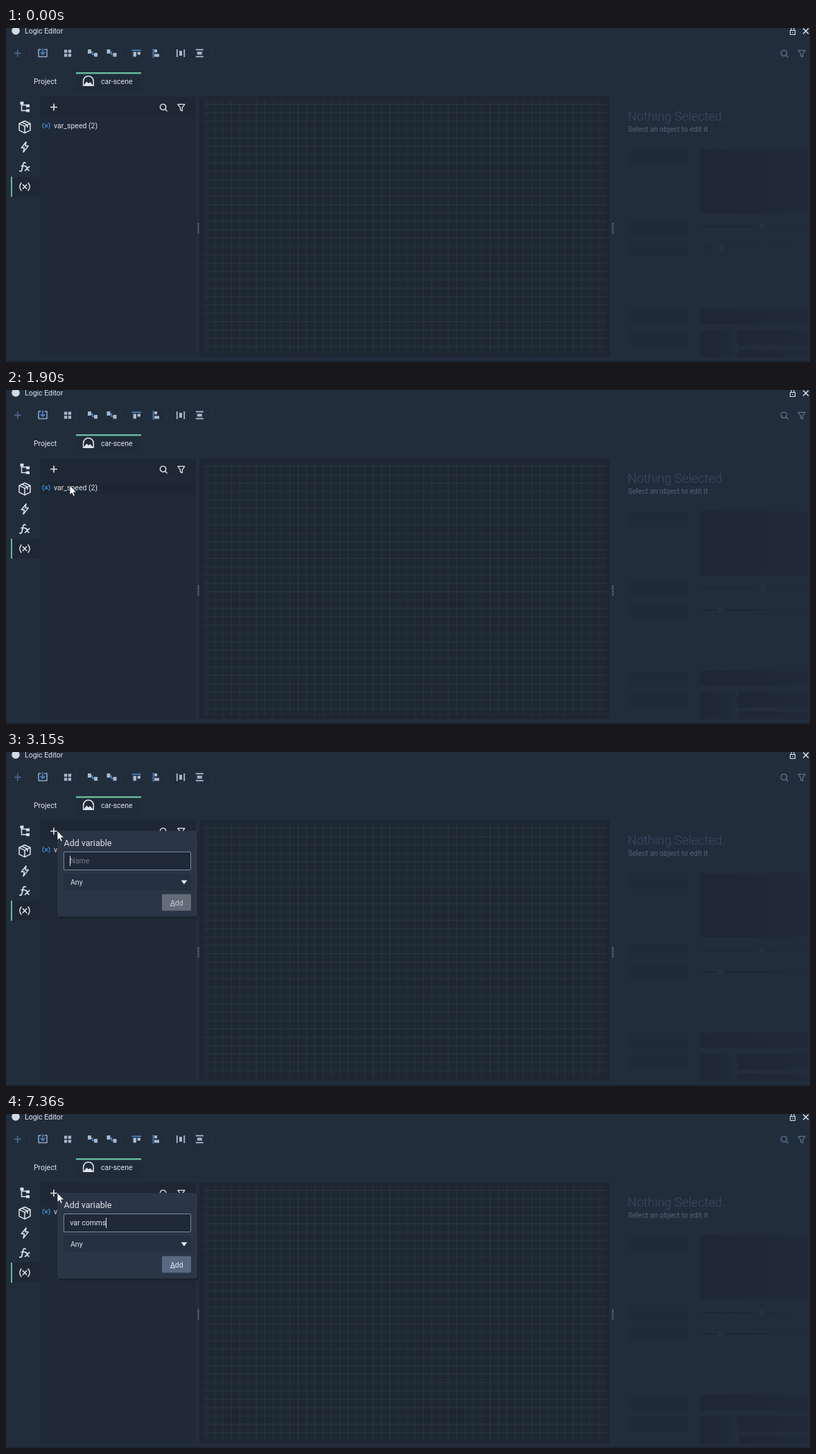
Recreate the animation shown at these times as an HTML page. Size 1160 by 483 pixels, loop 7.99 s.

```html
<!DOCTYPE html>
<html lang="en">
<head>
<meta charset="utf-8">
<title>Logic Editor</title>
<style>
html, body { margin: 0; width: 100%; height: 100%; overflow: hidden; background: #222d3c; }
svg { display: block; width: 100vw; height: 100vh; }
text { font-family: Roboto, "Noto Sans", sans-serif; font-size: 10.5px; fill: #dfe3e8; white-space: pre; }
.line { fill: none; stroke: #dfe5ec; stroke-width: 1.5; stroke-linecap: round; stroke-linejoin: round; }
.blue { stroke: #4b8cd0; }
</style>
</head>
<body>
<svg viewBox="0 0 1160 483">
<defs>
  <linearGradient id="fade">
    <stop offset="0" stop-color="#1e2733"/>
    <stop offset=".5" stop-color="#1f2834"/>
    <stop offset="1" stop-color="#212a39"/>
  </linearGradient>
  <filter id="shadow" x="-10%" y="-10%" width="120%" height="125%">
    <feDropShadow dx="1" dy="1.5" stdDeviation="1.3" flood-color="#0d131b" flood-opacity=".65"/>
  </filter>
  <clipPath id="side"><rect x="880" y="92" width="280" height="384"/></clipPath>
  <g id="variable" fill="none" stroke-width="1.6" stroke-linecap="round">
    <path id="paren" d="M-5 -5.5Q-9.4 0 -5 5.5"/>
    <use href="#paren" transform="scale(-1 1)"/>
    <path d="M-2.6 -2.8L2.6 2.8M2.6 -2.8L-2.6 2.8"/>
  </g>
  <g id="search" fill="none" stroke-width="1.4" stroke-linecap="round">
    <circle cx="-.6" cy="-.7" r="4.2"/><path d="M2.4 2.4L5 5"/>
  </g>
  <path id="funnel" d="M-5 -4.6H5L1.5 .1V4.9L-1.4 3.4V.1Z" fill="none" stroke-width="1.3" stroke-linejoin="round"/>
  <path id="plus" d="M-5 0H5M0 -5V5" stroke-width="1.6"/>
</defs>

<rect width="1160" height="483" fill="#222d3c"/>
<rect y="481" width="1160" height="2" fill="#1d2632"/>

<!-- title bar -->
<circle cx="14" cy="4" r="5.8" fill="#d3d9e0"/>
<text x="27" y="8">Logic Editor</text>
<path class="line" style="stroke-width:1.1" d="M1131.5 3.5h7v6h-7zM1133 3.5v-2a2 2 0 0 1 4 0v2M1135 6v1"/>
<path class="line" d="M1150.5 1l7 7m0-7l-7 7"/>

<g id="toolbar">
  <use href="#plus" x="16.7" y="36.5" stroke="#4f6d93"/>
  <path class="line" style="stroke:#8fa9c6" d="M50 31h-3v10.5h12v-10.5h-3"/>
  <path class="line blue" d="M53 30v8m-2.8-2.6l2.8 2.8l2.8-2.8"/>
  <path class="line blue" d="M182 32.3h12.5M212.5 30.5v12"/>
  <g stroke="#58728f"><use href="#search" x="1123" y="37"/><use href="#funnel" x="1148" y="37"/></g>
</g>

<!-- tabs -->
<rect x="101" y="64" width="94" height="27" fill="#202b39"/>
<rect x="101" y="64" width="94" height="2.4" fill="#6abb9f"/>
<rect y="90" width="1160" height="1" fill="#1f2937"/>
<text x="40" y="81">Project</text>
<text x="137" y="81">car-scene</text>
<path class="line" d="M111.6 83.3v-6.5a7.3 7.3 0 0 1 14.6 0v6.5z"/>
<path d="M112 83l4.4-5.5l2.6 2.6l2.3-1.8l4.5 4.7z" fill="#dfe5ec"/>

<!-- mode strip -->
<rect x="9" y="215" width="40" height="29" fill="#1e2835"/>
<rect x="7" y="215" width="2" height="29" fill="#68b79b"/>
<path class="line" d="M22.5 108v11.5h6.5M22.5 111.5h6.5"/>
<path class="line" d="M27 134.5l8 3.7v9.6l-8 4l-8-4v-9.6zM19.2 138.4l7.8 3.8l7.8-3.8M27 142.2v9.3M23 136.4l8 3.8v3.3"/>
<path class="line" d="M29 164.8l-6.7 8.5h4.1l-1.4 6.2l7.2-8.9h-4.4z"/>
<path class="line" style="stroke-width:1.7" d="M28.2 195.2q-2.8-1.6-3.5 1.8l-1.8 8q-.7 3.2-3.1 1.8M22 199.5h5.4M28.2 200.5q1.5-.7 2.2 2t2.6 3.5M33.6 200.4l-6 5.8"/>
<use href="#variable" transform="translate(27 229.5)" stroke="#dfe5ec"/>

<!-- variable list -->
<rect x="49" y="99" width="224.5" height="377" rx="2" fill="#1f2937"/>
<rect x="49" y="99" width="224.5" height="29" rx="2" fill="#1e2835"/>
<rect id="row" x="49" y="133" width="224" height="18" fill="#1d2734"/>
<g stroke="#dfe5ec">
  <use href="#plus" x="69" y="114.5"/>
  <use href="#search" x="227.2" y="115"/>
  <use href="#funnel" x="252.8" y="115"/>
</g>
<use href="#variable" transform="translate(58 141.3) scale(.72)" stroke="#3f8fe0"/>
<text x="69" y="145">var_speed (2)</text>

<!-- canvas -->
<rect x="279" y="99" width="592" height="377" rx="2" fill="#1d2632"/>
<rect x="285" y="104" width="581" height="368" fill="#1d2833"/>
<path id="grid" stroke="#293541"/>
<path d="M277.5 282.5v14.5M875.5 282.5v14.5" stroke="#8793a1" stroke-width="2" stroke-dasharray="1.2 1.5"/>

<g id="inspector" clip-path="url(#side)">
  <text x="897" y="134" style="font-size:18.2px;font-weight:300;fill:#3a4b65">Nothing Selected.</text>
  <text x="897.5" y="150" style="fill:#566477">Select an object to edit it</text>
</g>

<circle id="press" cx="74" cy="114" r="12" fill="#dfe5ec" fill-opacity=".2"/>

<g id="popup">
  <rect x="74" y="114" width="202" height="124" rx="4" fill="#2a3545" filter="url(#shadow)"/>
  <text x="83.5" y="136" style="font-size:12.5px">Add variable</text>
  <rect x="83.5" y="144.5" width="183" height="26" rx="1.5" fill="#1f2937" stroke="#7a8ba5"/>
  <text id="entry" x="92.3" y="161"></text>
  <rect id="caret" y="150" width="1" height="15" fill="#dfe3e8"/>
  <rect x="83" y="176" width="184" height="24" rx="2" fill="#253040"/>
  <text x="93" y="192">Any</text>
  <path d="M252.5 185.5h9l-4.5 5.7z" fill="#e6eaef"/>
  <rect id="button" x="225" y="205.5" width="42" height="24" rx="1.5"/>
  <g id="label">
    <text x="237" y="221.5" style="fill:inherit">Add</text>
    <rect x="237" y="222" width="7" height="1"/>
  </g>
</g>

<path id="arrow" d="M0 0v13.6l3.1-2.9l2.1 4.7l2.2-1l-2-4.5h4.3z" fill="#fff" stroke="#10161e" stroke-width=".7"/>
<path id="resize" d="M-9.5 0l4.5-4.5v3.3h10v-3.3l4.5 4.5l-4.5 4.5v-3.3h-10v3.3z" fill="#fff" stroke="#10161e" stroke-width=".8"/>
</svg>

<script>
const LOOP = 7990, STEP = 75, BLINK = 530;
const POPUP = 3090, PRESS = 2850;
const $ = id => document.getElementById(id);
const show = (id, on) => $(id).style.display = on ? "" : "none";

function box(parent, x, y, w, h, fill) {
  const el = document.createElementNS("http://www.w3.org/2000/svg", "rect");
  Object.entries({ x, y, width: w, height: h, fill }).forEach(([k, v]) => el.setAttribute(k, v));
  $(parent).append(el);
}

function drawToolbar() {
  const tool = (...shape) => box("toolbar", ...shape, "#a9bacd");
  for (let i = 0; i < 5; i++) box("toolbar", 34 + i * 65.5, 30, 1, 13, "#293546");
  for (let i = 0; i < 4; i++) tool(84 + i % 2 * 5.8, 31.5 + (i >> 1) * 5.8, 4.3, 4.3);
  for (const x of [125, 152.5]) {
    tool(x - 7, 31, 5, 6);
    tool(x + 2, 36, 5, 5.5);
    box("toolbar", x - 2, 34, 2, 1.5, "#4b8cd0");
    box("toolbar", x - 1, 34, 1.5, 5, "#4b8cd0");
    box("toolbar", x, 37.5, 2, 1.5, "#4b8cd0");
  }
  // bars aligned to an edge, then bars spread evenly
  for (let i = 0; i < 2; i++) {
    tool(183.5 + i * 6, 34.5, 4.5, 7 - i * 3);
    tool(214, 31 + i * 6.5, 4 + i * 3, 4.2);
  }
  for (let i = -1; i <= 1; i++) {
    const thick = i ? 1.8 : 4, long = i ? 11 : 7;
    tool(252 + i * 5.2 - thick / 2, 36.5 - long / 2, thick, long);
    tool(279.3 - long / 2, 36.4 + i * 5 - thick / 2, long, thick);
  }
  for (let i = 0; i < 3; i++) box("toolbar", i ? 29 : 20.5, 106.5 + i * 4 + (i > 1) * 3, 5, 4, "#dfe5ec");
}

function drawInspector() {
  for (const y of [176, 276, 307, 406, 437]) box("inspector", 898, y, 86, 23, "#202b39");
  const field = (...shape) => box("inspector", ...shape, "url(#fade)");
  field(1001, 175, 159, 93);
  field(1001, 406, 159, 22);
  field(1001, 437, 48, 40);
  for (const y of [437, 465]) field(1056, y, 104, 22);
  [1091, 1032].forEach((x, i) => {
    const y = 287 + i * 31;
    field(1001, y - 1, 159, 2);
    $("inspector").insertAdjacentHTML("beforeend", `<circle cx="${x}" cy="${y}" r="5" fill="#253040"/>`);
  });
}

function drawGrid() {
  let d = "";
  for (let x = 289; x < 866; x += 12.04) d += `M${x} 104V472`;
  for (let y = 110.5; y < 472; y += 12.08) d += `M285 ${y}H866`;
  $("grid").setAttribute("d", d);
}

// Each sweep starts where the previous one ended; a higher power brakes harder.
const sweeps = [
  { at: 130, steps: 4, to: [602, 307], power: 3 },
  { at: 590, steps: 4, to: [279, 294], power: 3 },
  { at: 1140, steps: 4, to: [151, 231], power: 3 },
  { at: 1600, steps: 5, to: [92, 138], power: 3 },
  { at: 1975, steps: 6, to: [75, 117], power: 1 },
  { at: 2470, steps: 2, to: [74, 114], power: 1 }
];

function pointer(t) {
  let pos = [1382, 660];
  for (const { at, steps, to, power } of sweeps) {
    if (t < at) break;
    const u = Math.min(Math.floor((t - at) / STEP) + 1, steps) / steps;
    const eased = 1 - (1 - u) ** power;
    pos = pos.map((from, i) => Math.round(from + (to[i] - from) * eased));
  }
  return pos;
}

const phrase = "var comms";
const keys = [4870, 5020, 5330, 5570, 6030, 6200, 6430, 7280, 7360];

function drawEntry(t) {
  const count = keys.filter(k => k <= t).length;
  const entry = $("entry");
  entry.textContent = count ? phrase.slice(0, count) : "Name";
  entry.style.fill = count ? "#dfe3e8" : "#737e8d";
  $("button").style.fill = count ? "#596981" : "#636d79";
  $("label").style.fill = count ? "#e3e7ec" : "#c3c9d0";

  const idle = t - (count ? keys[count - 1] + 100 : POPUP + 10);
  show("caret", Math.floor(Math.max(idle, 0) / BLINK) % 2 === 0);
  const x = count ? entry.getEndPositionOfChar(count - 1).x : 92;
  $("caret").setAttribute("x", Math.floor(x));
}

function render(t) {
  const [x, y] = pointer(t);
  const resizing = Math.abs(x - 279) < 4;
  show("arrow", !resizing);
  show("resize", resizing);
  for (const id of ["arrow", "resize"]) $(id).setAttribute("transform", `translate(${x} ${y})`);
  show("row", x < 273 && y > 124 && y < 151);
  show("press", t >= PRESS && t < POPUP);
  show("popup", t >= POPUP);
  if (t >= POPUP) drawEntry(t);
}

drawToolbar();
drawInspector();
drawGrid();
const start = performance.now();
function tick() {
  render((performance.now() - start) % LOOP);
  requestAnimationFrame(tick);
}
tick();
</script>
</body>
</html>
```
